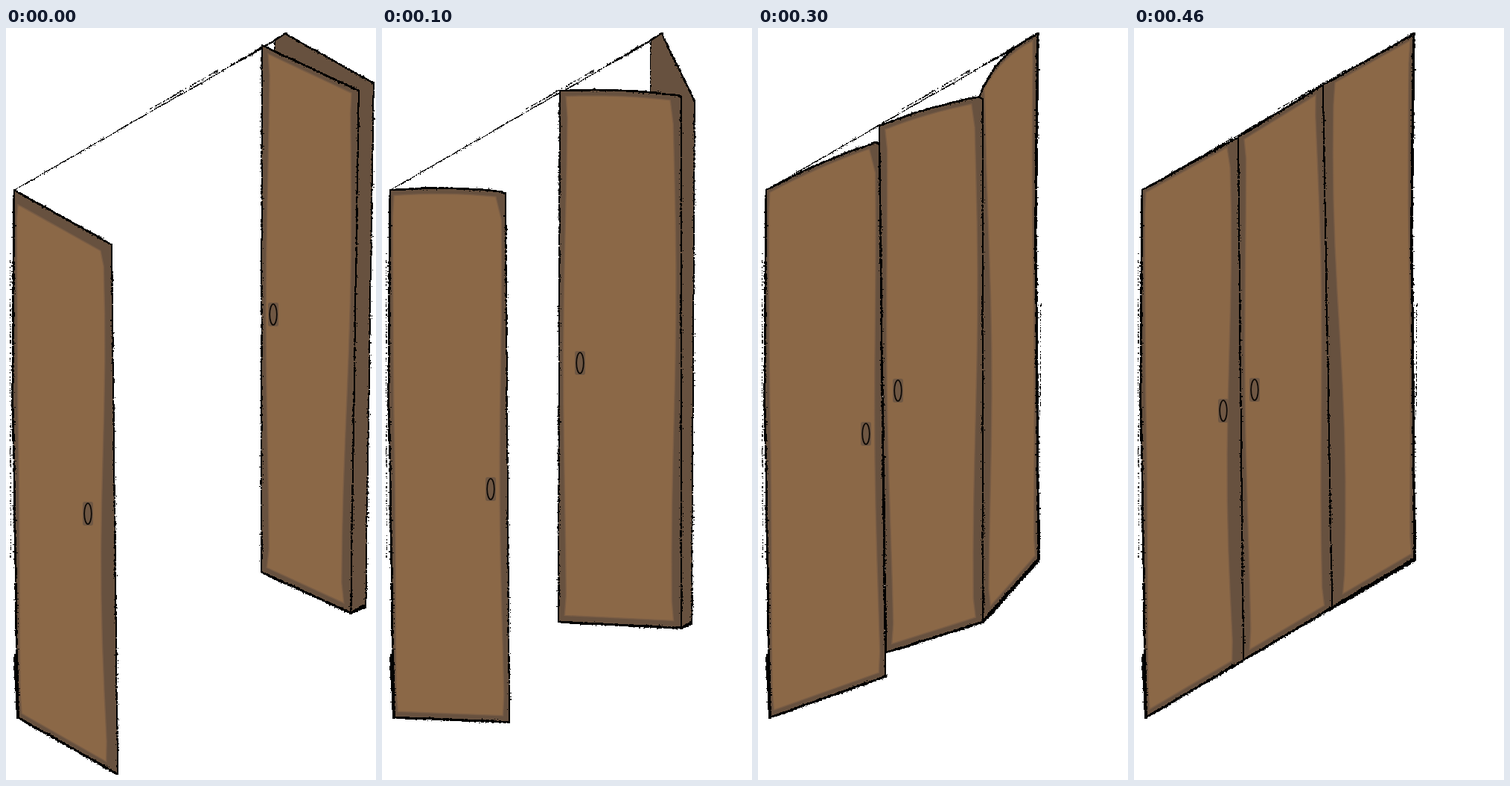
An HTML page that plays this animation: 497x1008 px, repeating every 500 ms.

```html
<!DOCTYPE html>
<html lang="en">
<head>
<meta charset="utf-8">
<title>Folding doors</title>
<style>
  html, body { margin: 0; width: 100%; height: 100%; overflow: hidden; background: #fff; }
  svg { display: block; width: 497px; height: 1008px; }
  .pose { visibility: hidden; animation: show 500ms step-end infinite; }
  .wood { fill: #8b6847; stroke: #7a5d45; stroke-width: 1.5; }
  .shade { fill: #67513f; }
  .pad { fill: #6f5743; }
  .grip { fill: none; stroke: #0b0806; stroke-width: 1.7; }
  .ink { fill: #000; shape-rendering: crispEdges; }
  @keyframes show {
    0% { visibility: visible; }
    20%, 100% { visibility: hidden; }
  }
</style>
</head>
<body>
<svg id="stage" viewBox="0 0 497 1008"></svg>
<script>
const points = text => text.split(' ').map(p => p.split(',').map(Number));
const mix = (a, b, t) => a + (b - a) * t;
const between = (p, q, t) => [mix(p[0], q[0], t), mix(p[1], q[1], t)];
const last = list => list[list.length - 1];
const steps = (n, from, to) => Array.from({ length: n + 1 }, (_, i) => mix(from, to, i / n));
const shape = (kind, pts) => `<polygon class="${kind}" points="${pts.join(' ')}"/>`;

function randomizer(seed) {
  return () => {
    seed = (seed * 1664525 + 1013904223) >>> 0;
    return seed / 4294967296;
  };
}

// Dry brush stroke: small dabs along a polyline, with gaps and loose flecks.
function ink(width, pts, dry = 0.08, flecks = 0.1) {
  const rnd = randomizer(77);
  let d = '', drift = 0;
  const dab = (x, y, size) => {
    const s = Math.max(size, 1.2).toFixed(1);
    d += `M${(x - s / 2).toFixed(1)} ${(y - s / 2).toFixed(1)}h${s}v${s}h-${s}z`;
  };
  for (let i = 1; i < pts.length; i++) {
    const [ax, ay] = pts[i - 1], [bx, by] = pts[i];
    const len = Math.hypot(bx - ax, by - ay);
    const nx = (ay - by) / len, ny = (bx - ax) / len;
    for (let s = 0; s < len; s += 1.2) {
      drift = drift * 0.93 + (rnd() - 0.5) * 0.3;
      const [x, y] = between(pts[i - 1], pts[i], s / len);
      const size = width * mix(0.6, 1.1, rnd());
      if (rnd() > dry) dab(x + nx * drift, y + ny * drift, size);
      if (rnd() < flecks) {
        const off = (rnd() < 0.5 ? -1 : 1) * (width / 2 + 1);
        dab(x + nx * off, y + ny * off, 1);
      }
    }
  }
  return `<path class="ink" d="${d}"/>`;
}

// Point at share t of an edge's height.
function along(edge, t) {
  const y = mix(edge[0][1], last(edge)[1], t);
  let i = 1;
  while (i < edge.length - 1 && edge[i][1] < y) i++;
  const [p, q] = [edge[i - 1], edge[i]];
  return between(p, q, (y - p[1]) / (q[1] - p[1]));
}

// A door between two upright edges: shaded rim, lighter face, inked outline.
// rim holds the left, top, right and bottom margins of the face.
function door(left, right, rim, { cut = 0, bow = 0, base = 3.2 } = {}) {
  const [l, t, r, b] = rim;
  const tl = left[0], bl = last(left), br = last(right);
  const tr = [right[0][0] - cut, right[0][1] - cut * 0.6];
  const width = tr[0] - tl[0], len = Math.hypot(width, tr[1] - tl[1]);
  const arch = u => {
    const [x, y] = between(tl, tr, u), lift = 4 * u * (1 - u) * bow / len;
    return [x + lift * (tr[1] - tl[1]), y - lift * width];
  };
  const slope = v => mix((tr[1] - tl[1]) / width, (br[1] - bl[1]) / (br[0] - bl[0]), v);
  const side = (edge, margin) => steps(10, 0.05, 0.95).map(v => {
    const [x, y] = along(edge, v), m = margin * (1 + 0.3 * Math.sin(6 * v + margin));
    return [x + m, y + m * slope(v)];
  });
  const floor = u => {
    const [x, y] = between(bl, br, u);
    return [x, y - b];
  };
  const top = steps(8, 0, 1).map(arch);
  const u0 = l / width, u1 = 1 - r / width;
  const face = [
    ...steps(8, u0, u1).map(arch).map(([x, y]) => [x, y + t]),
    ...side(right, -r), floor(u1), floor(u0), ...side(left, l).reverse()
  ];
  return shape('shade', [...top, ...right, ...left.slice().reverse()]) +
    shape('wood', face) +
    ink(2.8, [...top, right[0]]) + ink(2.4, right) + ink(2.4, left) + ink(base, [bl, br]);
}

// Reverse side of the folded door, seen past its front neighbour.
function backside(edge, fold) {
  const post = [361, 18], hidden = [361, 400];
  return shape('shade', [post, wall[0], ...edge, last(fold), hidden]) +
    ink(1.3, [post, hidden], 0.1, 0) + ink(2.6, [wall[0], edge[0]]) +
    ink(2.2, edge) + ink(4.5, [last(fold), last(edge)]);
}

const handle = ([x, y]) =>
  `<rect class="pad" x="${x - 7}" y="${y - 16}" width="14" height="32" rx="3"/>` +
  `<ellipse class="grip" cx="${x}" cy="${y}" rx="4.8" ry="14"/>`;

const hinge = points('11,217 9,480 16,924');
const wall = points('376,8 373,260 377,712');
const corners = [hinge[0], wall[0]];

const rail = ink(1.6, corners, 0.12) +
  ink(1.5, steps(1, 0.5, 0.75).map(u => between(...corners, u)).map(([x, y]) => [x, y - 4]), 0.4) +
  ink(2.6, [between(...corners, 0.8), corners[1]], 0.2) +
  ink(4, [between(...corners, 0.96), corners[1]]);

const hingeMarks = ink(3, hinge) + ink(4, [[12, 840], last(hinge)]) +
  ink(1.3, points('6,300 6,710'), 0.6, 0);
const wallMarks = ink(3.6, wall) + ink(1.3, points('380,370 379,520'), 0.5, 0);

// Upright edges: free side of the left door, front side and fold of the pair.
const poses = [
  { free: '142,290 150,1000', lead: '344,23 343,729', fold: '474,84 463,784',
    back: '494,74 483,774', grips: '110,651 359,384' },
  { free: '166,222 171,930', lead: '239,84 237,796', fold: '402,93 402,804',
    back: '420,98 416,797', grips: '146,618 266,449' },
  { free: '181,170 186,880', lead: '184,119 188,830', fold: '329,98 335,805',
    grips: '169,575 222,484' },
  { free: '163,156 171,869', lead: '163,131 172,837', fold: '302,95 302,796',
    grips: '145,544 188,486' },
  { free: '140,146 147,847', lead: '140,146 147,847', fold: '254,76 266,777',
    grips: '120,513 162,485' }
];

function draw(pose, i) {
  const open = 1 - i / (poses.length - 1);
  const [free, lead, fold] = [pose.free, pose.lead, pose.fold].map(points);
  const cut = 7 * Math.sin(Math.PI * open), bow = cut * 0.7;
  const joint = [[fold[0][0] - cut, fold[0][1] - cut * 0.6], last(fold)];
  const pair = pose.back
    ? backside(points(pose.back), fold)
    : door(joint, wall, [16 - 20 * open, 6, 5, 10],
        { bow: 12 * Math.sin(2 * Math.PI * open), base: 4.5 }) + wallMarks;
  return rail + pair +
    door(lead, fold, [8, 8, 10, 9], { cut, bow }) +
    door(hinge, free, [5, 6 + 11 * open ** 6, 6 + 9 * (2 * open - 1) ** 2, 8], { cut, bow }) +
    hingeMarks + points(pose.grips).map(handle).join('');
}

document.getElementById('stage').innerHTML = poses.map((pose, i) =>
  `<g class="pose" style="animation-delay:${i * 100 - 500}ms">${draw(pose, i)}</g>`).join('');
</script>
</body>
</html>
```
